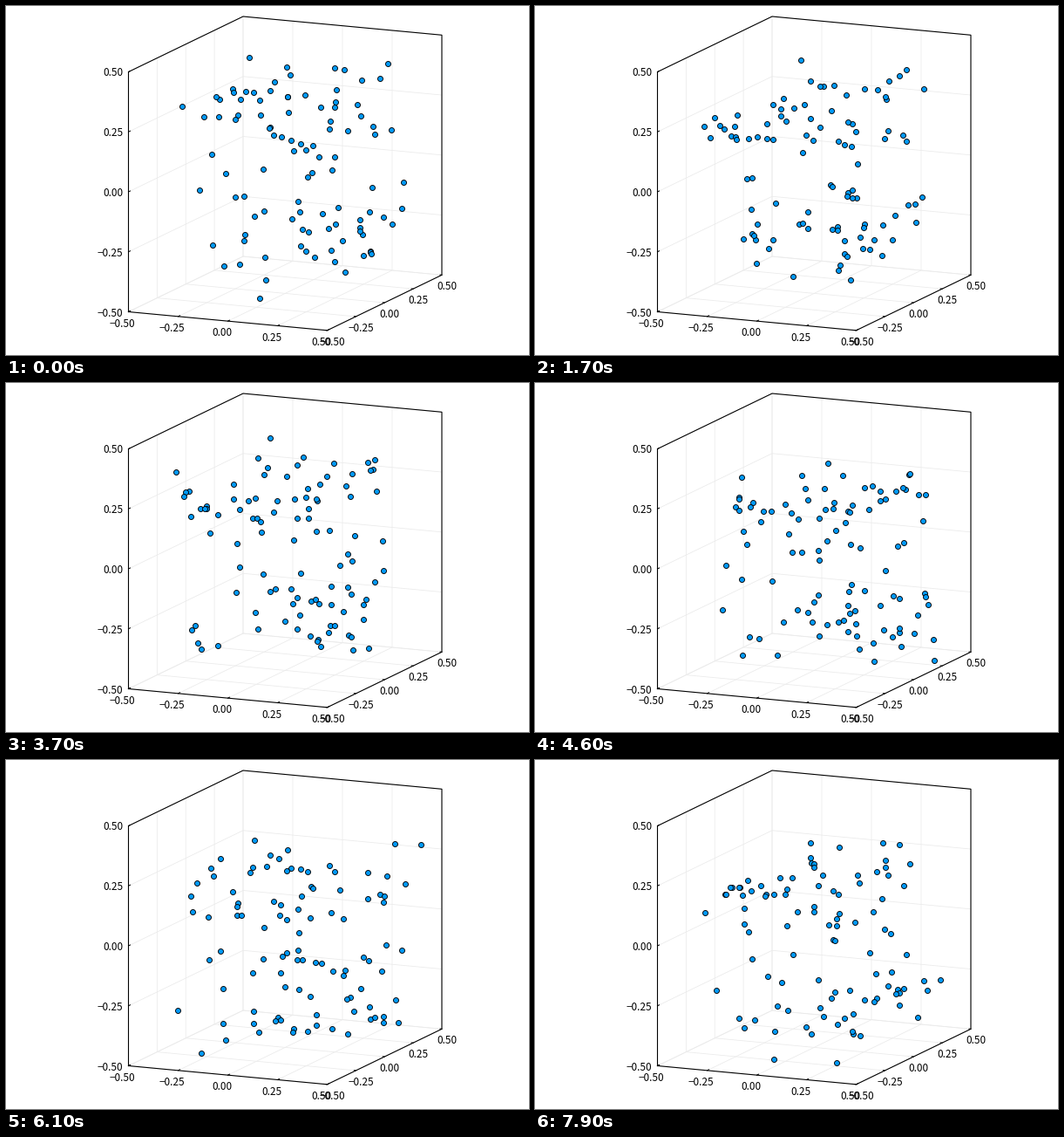
A matplotlib script that plays this animation: 600x400 px, repeating every 8 s.

```python
import matplotlib.pyplot as plt
import numpy as np
from matplotlib.animation import FuncAnimation

W, H, DPI = 600, 400, 100
FRAMES, STEP = 80, 100
COUNT = 100
WARMUP = 60
WELL = 0.27
PX = 72 / DPI
TICKS = [-0.5, -0.25, 0, 0.25, 0.5]

plt.rcParams["font.family"] = "Noto Sans CJK JP"


def project(x, y, z):
    """Oblique view of the unit cube, in stage pixels."""
    u, v, w = x + 0.5, y + 0.5, z + 0.5
    return 140.5 + 228 * u + 131.5 * v, 350.5 + 21.3 * u - 63.5 * v - 275 * w


def simulate():
    """Brownian particles in a double-well potential on each axis."""
    rng = np.random.default_rng(12)
    pos = rng.choice([-WELL, WELL], (COUNT, 3)) + rng.normal(0, 0.08, (COUNT, 3))
    path = []
    for _ in range(WARMUP + FRAMES):
        pull = 0.04 * pos * (1 - (pos / WELL) ** 2)
        pos = pos + pull + rng.normal(0, 0.033, pos.shape)
        path.append(pos)
    return np.array(path[WARMUP:])


def sway(t):
    """Drift shared by the whole cloud, in pixels, eased between a few poses."""
    times = [0, 1.7, 2.5, 3.7, 5.4, 6.9, 7.9]
    dx = [10, -5, -10, 0, 33, -4, 8]
    dy = [-5, 0, 5, 2, 28, 15, 20]
    i = min(np.searchsorted(times, t, side="right") - 1, len(times) - 2)
    s = np.clip((t - times[i]) / (times[i + 1] - times[i]), 0, 1)
    s = s * s * (3 - 2 * s)
    return dx[i] + s * (dx[i + 1] - dx[i]), dy[i] + s * (dy[i + 1] - dy[i])


fig = plt.figure(figsize=(W / DPI, H / DPI), dpi=DPI, facecolor="white")
ax = fig.add_axes([0, 0, 1, 1])
ax.set_xlim(0, W)
ax.set_ylim(H, 0)
ax.axis("off")


def polyline(points, color, width):
    xs, ys = zip(*(project(*p) for p in points))
    ax.plot(xs, ys, color=color, lw=width * PX, solid_joinstyle="miter")


def label(x, y, value, ha="center"):
    text = f"{value:.2f}".replace("-", "\u2212")
    ax.text(x, y, text, size=8.5, ha=ha, va="center_baseline", color="black")


def tick(x, y, dx, dy):
    ax.plot([x, x + dx], [y, y + dy], color="black", lw=PX)


lo, hi = -0.5, 0.5
for c in TICKS:
    polyline([(c, lo, lo), (c, hi, lo), (c, hi, hi)], "#ebebeb", 0.8)
    polyline([(hi, c, lo), (lo, c, lo), (lo, c, hi)], "#ebebeb", 0.8)
    polyline([(lo, lo, c), (lo, hi, c), (hi, hi, c)], "#ebebeb", 0.8)

polyline([(lo, lo, lo), (hi, lo, lo), (hi, hi, lo), (hi, hi, hi),
          (lo, hi, hi), (lo, lo, hi), (lo, lo, lo)], "black", 1.1)

for i, c in enumerate(TICKS):
    tick(*project(c, lo, lo), 2, -1)
    tick(*project(hi, c, lo), -2, -0.2)
    tick(*project(lo, lo, c), 2, -1)
    label(134, project(lo, lo, c)[1], c, "right")
    label(133.5 + 57 * i, 363 + 5.2 * i, c)
    label(374 + 33 * i, 384 - 16 * i, c)

path = simulate()
dots, = ax.plot([], [], "o", ms=6 * PX, mfc="#009afa", mec="black", mew=0.9 * PX)


def draw(k):
    x, y = project(*path[k].T)
    dx, dy = sway(k * STEP / 1000)
    dots.set_data(x + dx, y + dy)
    return (dots,)


anim = FuncAnimation(fig, draw, frames=FRAMES, interval=STEP,
                     repeat=True, repeat_delay=0)
plt.show()
```
